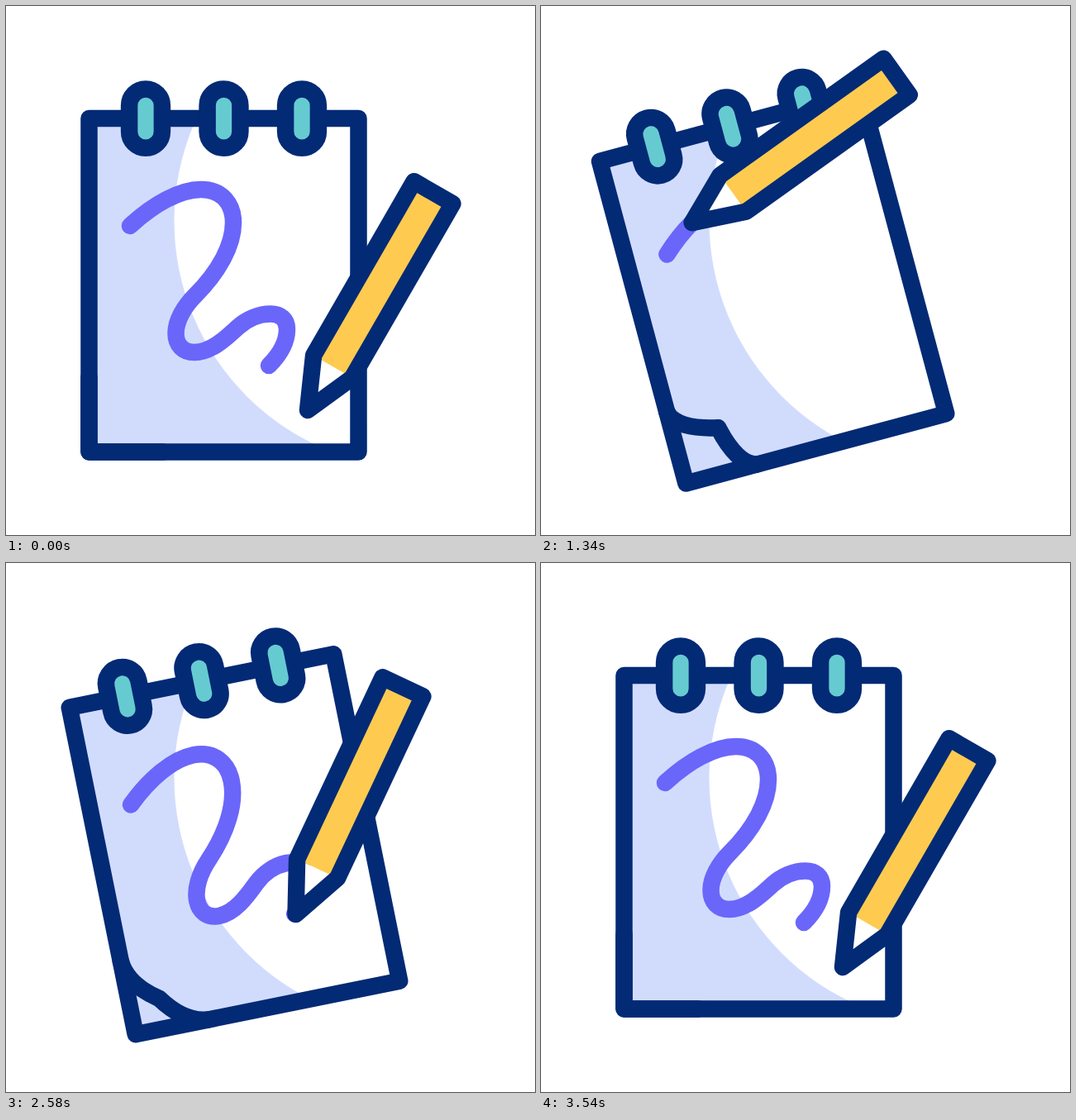
These frames come from a looping animation (640 px wide and 640 px high, 3.6 s). An HTML page:

```html
<!DOCTYPE html>
<html lang="en">
<head>
<meta charset="utf-8">
<title>Notepad and pencil</title>
<style>
  html, body { margin: 0; width: 100%; height: 100%; overflow: hidden; background: #fff; }
  svg { display: block; width: 100vw; height: 100vh; }
  .line { fill: none; stroke: #032a75; stroke-width: 20.5; stroke-linejoin: round; stroke-linecap: round; }
</style>
</head>
<body>
<svg viewBox="0 0 640 640">
  <g class="page"><rect x="100.5" y="136" width="326" height="403.5" fill="#d1dcfd"/></g>
  <circle cx="503.5" cy="260" r="300" fill="#fff"/>
  <g class="page">
    <rect class="line" x="100.5" y="136" width="326" height="403.5"/>
    <g id="rings"></g>
    <path id="scribble" fill="none" stroke="#6a66fa" stroke-width="20.5" stroke-linecap="round" stroke-linejoin="round"
      d="M150 266C178 240 210 222 236 222C262 222 275 240 275 262C275 290 257 322 229 350C215 364 205.5 381 205.5 396C205.5 410 214 419 228 419C247 419 264 404 280 389C291 379 306 372.5 320 372.5C332 372.5 340 379 340 391C340 407 330 423 318 435"/>
    <path id="curl" class="line"/>
  </g>
  <g id="pencil">
    <path d="M0 0L-27 -61H27Z" fill="#fff"/>
    <rect x="-27" y="-304" width="54" height="243" fill="#fecb50"/>
    <path class="line" d="M0 0L-27 -61V-304H27V-61Z"/>
  </g>
</svg>
<script>
const LOOP = 3600;
const PIVOT = { x: 282.5, y: 274 };
const CORNER = { x: 100.5, y: 539.5 };
const TILT = 15;
const DRAW_START = 1115, DRAW_END = 2540;

const byId = id => document.getElementById(id);
const pages = document.querySelectorAll('.page');
const scribble = byId('scribble'), curl = byId('curl'), pencil = byId('pencil');
const inkLength = scribble.getTotalLength();

byId('rings').innerHTML = [169, 263.5, 358].map(x =>
  `<rect class="line" style="fill:#66cbd1" x="${x - 19.9}" y="100.4" width="39.8" height="71.4" rx="19.9"/>`).join('');

// time, tip x, tip y
const approach = [
  [0, 365, 489], [150, 365, 466], [300, 363, 406], [400, 357, 355], [540, 327, 274],
  [740, 222, 208], [900, 177, 262], [1000, 157, 291], [DRAW_START, 152.3, 300]
];
const leave = [[DRAW_END, 350.7, 424], [2880, 349.5, 458], [3240, 362.8, 484.7], [3540, 365, 489]];
// time, pencil angle from vertical
const lean = [
  [0, 30], [150, 33], [300, 40], [400, 46], [540, 53], [740, 60.7], [900, 49], [1000, 40],
  [DRAW_START, 34], [1340, 54.4], [1500, 69], [1600, 76], [1660, 68.3], [1800, 50], [1950, 40],
  [2100, 37], [2280, 35], [2400, 33], [DRAW_END, 26.5], [2720, 22], [2880, 20.8], [3240, 28.7], [3540, 30]
];
// time, share of the scribble drawn
const ink = [[DRAW_START, 0], [1340, 0.09], [1660, 0.359], [2280, 0.802], [DRAW_END, 1]];

const mix = (a, b, k) => a + (b - a) * k;

function smooth(t, from, to) {
  const u = Math.min(1, Math.max(0, (t - from) / (to - from)));
  return u * u * (3 - 2 * u);
}

// Smooth curve through keys, at rest at both ends
function track(keys, t, col = 1) {
  const last = keys.length - 1;
  if (t <= keys[0][0]) return keys[0][col];
  if (t >= keys[last][0]) return keys[last][col];
  const i = keys.findIndex(k => k[0] > t) - 1;
  const slope = n => n === 0 || n === last ? 0
    : (keys[n + 1][col] - keys[n - 1][col]) / (keys[n + 1][0] - keys[n - 1][0]);
  const a = keys[i], b = keys[i + 1], h = b[0] - a[0], s = (t - a[0]) / h;
  const ease = s * s * (3 - 2 * s);
  return mix(a[col], b[col], ease)
    + h * s * (1 - s) * ((1 - s) * slope(i) - s * slope(i + 1));
}

function onPage(p, deg) {
  const r = deg * Math.PI / 180, c = Math.cos(r), s = Math.sin(r);
  const x = p.x - PIVOT.x, y = p.y - PIVOT.y;
  return { x: PIVOT.x + x * c - y * s, y: PIVOT.y + x * s + y * c };
}

function curlPath(k) {
  const half = [
    [0, 90],
    [2.5 * k, mix(60, 73.5, k)],
    [24.5 * k, mix(30, 61.5, k)],
    [55 * k, 55 * k]
  ];
  const at = (x, y) => `${CORNER.x + x} ${CORNER.y - y}`;
  const [a, b, c, d] = half.map(p => at(p[0], p[1]));
  const [e, f, g] = half.map(p => at(p[1], p[0]));
  return `M${a}C${b} ${c} ${d}C${g} ${f} ${e}`;
}

function tipAt(t, drawn, tilt) {
  if (t > DRAW_START && t < DRAW_END) {
    return onPage(scribble.getPointAtLength(drawn * inkLength), tilt);
  }
  const keys = t <= DRAW_START ? approach : leave;
  return { x: track(keys, t, 1), y: track(keys, t, 2) };
}

function render(t) {
  const tilt = -TILT * (smooth(t, 0, 1200) - smooth(t, 2140, 3530));
  pages.forEach(p => p.setAttribute('transform', `rotate(${tilt} ${PIVOT.x} ${PIVOT.y})`));

  const drawn = t < DRAW_START ? 1 - smooth(t, 0, 600) : track(ink, t);
  scribble.style.display = drawn > 0.001 ? '' : 'none';
  scribble.setAttribute('stroke-dasharray', drawn < 1 ? `${drawn * inkLength} 2000` : 'none');

  curl.setAttribute('d', curlPath(smooth(t, 760, 1240) - smooth(t, 2280, 3060)));

  const tip = tipAt(t, drawn, tilt);
  pencil.setAttribute('transform', `translate(${tip.x} ${tip.y}) rotate(${track(lean, t)})`);
}

const began = performance.now();
function frame() {
  render((performance.now() - began) % LOOP);
  requestAnimationFrame(frame);
}
render(0);
requestAnimationFrame(frame);
</script>
</body>
</html>
```
